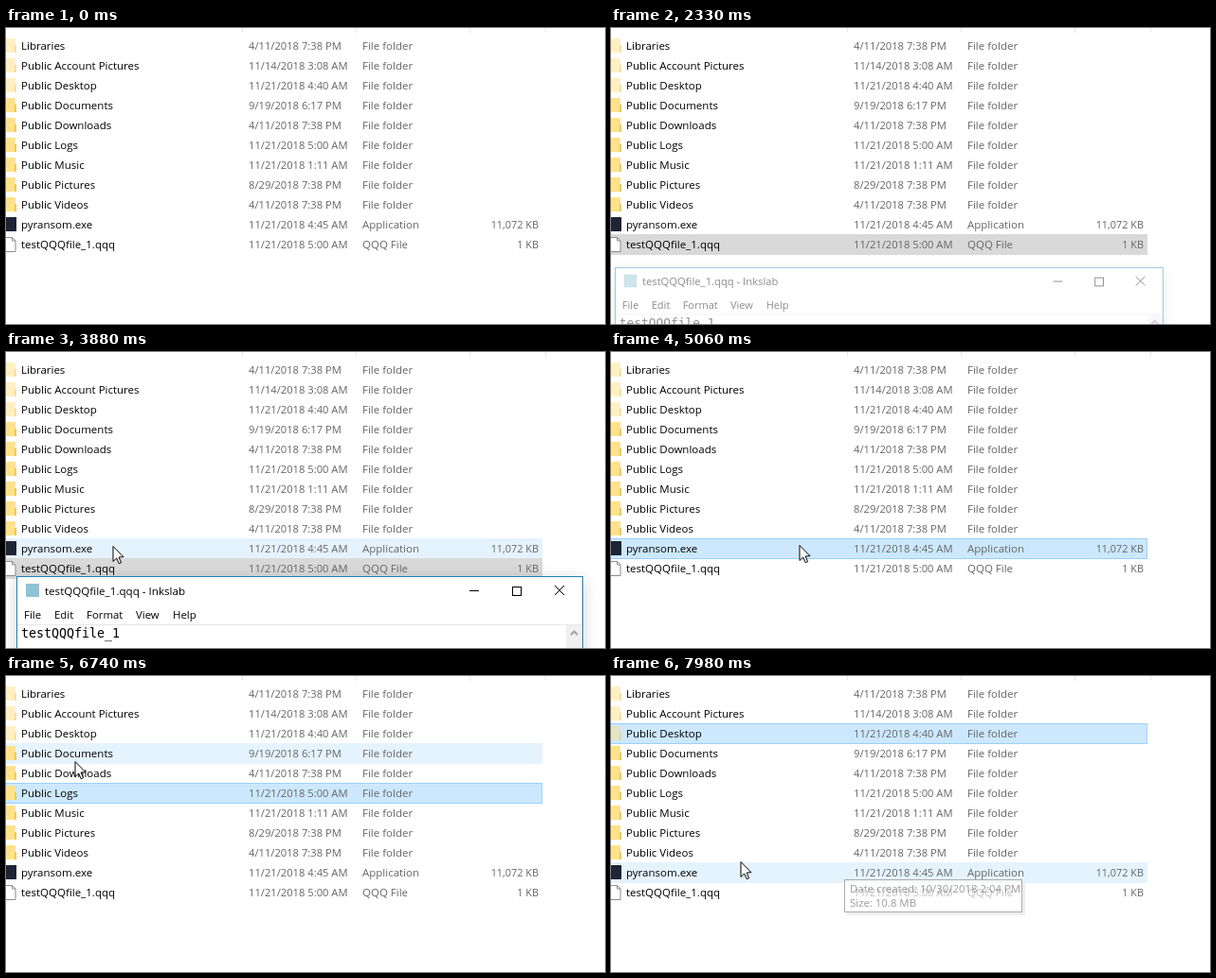
Write an HTML page with a canvas that moves like this. It is 632 by 313 pixels and loops after 8 s.

```html
<!DOCTYPE html>
<html lang="en">
<head>
<meta charset="utf-8">
<title>File list</title>
<style>
  html, body { margin: 0; width: 100%; height: 100%; overflow: hidden; background: #fff; }
  canvas { display: block; width: 632px; height: 313px; }
</style>
</head>
<body>
<canvas id="stage" width="632" height="313"></canvas>
<script>
const ctx = document.getElementById('stage').getContext('2d');
const LOOP = 8000, ROW = 21, TOP = 8, STEP = 60;
const UI = '"Open Sans", "Noto Sans", sans-serif';
const MONO = '"DejaVu Sans Mono", monospace';

const files = [
  ['Libraries', '4/11/2018 7:38 PM'],
  ['Public Account Pictures', '11/14/2018 3:08 AM'],
  ['Public Desktop', '11/21/2018 4:40 AM'],
  ['Public Documents', '9/19/2018 6:17 PM'],
  ['Public Downloads', '4/11/2018 7:38 PM'],
  ['Public Logs', '11/21/2018 5:00 AM'],
  ['Public Music', '11/21/2018 1:11 AM'],
  ['Public Pictures', '8/29/2018 7:38 PM'],
  ['Public Videos', '4/11/2018 7:38 PM'],
  ['pyransom.exe', '11/21/2018 4:45 AM', 'Application', '11,072 KB'],
  ['testQQQfile_1.qqq', '11/21/2018 5:00 AM', 'QQQ File', '1 KB']
];

// The pointer rests between stops; each stop is [arrival time, x, y].
const stops = [
  [0, 115, 340], [400, 104, 222], [900, 100, 219], [960, 100, 340],
  [2690, 228, 263], [3070, 247, 258], [3380, 249, 249], [3850, 113, 206],
  [4320, 203, 204], [4630, 199, 205], [5360, 165, 56], [5570, 141, 167],
  [5820, 120, 215], [6180, 76, 122], [6740, 73, 91], [7270, 74, 44],
  [7400, 76, 58], [7700, 128, 230], [7910, 138, 200], [7980, 137, 197]
];
const clicks = [740, 4060, 6490, 7400];
const blurs = [960, 5120];
const OPEN = 2330, OPENED = 2510, GRAB = 2690, DROP = 3400, CLOSED = clicks[1];

const lerp = (a, b, p) => a + (b - a) * p;
const last = (times, t) => times.filter(s => s <= t).pop() ?? -1;
const rowAt = y => Math.floor((y - TOP) / ROW);
const stepped = (t, from, span) => Math.min(1, Math.floor((t - from) / STEP) * STEP / span);

function pointerAt(t) {
  const i = stops.findIndex(s => s[0] > t);
  if (i < 0) return stops[stops.length - 1].slice(1);
  const [t0, x0, y0] = stops[i - 1], [t1, x1, y1] = stops[i];
  const span = Math.min(t1 - t0, 80 + 1.5 * Math.hypot(x1 - x0, y1 - y0));
  const p = Math.max(0, stepped(t, t1 - span, span));
  return [Math.round(lerp(x0, x1, p)), Math.round(lerp(y0, y1, p))];
}

// Left, top and opening progress; after GRAB the title bar follows the pointer.
function windowAt(t) {
  const p = stepped(t, OPEN, OPENED - OPEN);
  if (t < GRAB) return [lerp(4, -10, p), lerp(253, 251, p), p];
  const [x, y] = pointerAt(Math.min(t, DROP));
  return [x - 238, y - 12, 1];
}

function rect(x, y, w, h, color) {
  ctx.fillStyle = color;
  ctx.fillRect(x, y, w, h);
}

function frame(x, y, w, h, color) {
  ctx.strokeStyle = color;
  ctx.lineWidth = 1;
  ctx.strokeRect(x + .5, y + .5, w - 1, h - 1);
}

function text(str, x, y, size, color, align = 'left', family = UI) {
  ctx.font = `${size}px ${family}`;
  ctx.textAlign = align;
  ctx.fillStyle = color;
  ctx.fillText(str, x, y);
}

function line(color, width, ...points) {
  ctx.strokeStyle = color;
  ctx.lineWidth = width;
  ctx.beginPath();
  points.forEach(([x, y]) => ctx.lineTo(x, y));
  ctx.stroke();
}

function polygon(points, fill, stroke) {
  ctx.beginPath();
  points.forEach(([x, y]) => ctx.lineTo(x, y));
  ctx.closePath();
  ctx.fillStyle = fill;
  ctx.fill();
  ctx.strokeStyle = stroke;
  ctx.lineWidth = 1;
  ctx.stroke();
}

function drawFolder(mid, pale) {
  ctx.save();
  ctx.globalAlpha = pale ? .5 : 1;
  rect(-4, mid - 8, 14, 15, '#ffe28a');
  rect(9, mid - 1, 2, 8, '#f3c850');
  ctx.restore();
}

function drawPage(mid) {
  const l = -3.5, r = 10, t = mid - 7.5, b = mid + 7.5, fold = 3.5;
  polygon([[l, t], [r - fold, t], [r, t + fold], [r, b], [l, b]], '#fff', '#8c8c8c');
  line('#8c8c8c', 1, [r - fold, t], [r - fold, t + fold], [r, t + fold]);
}

function drawRow(i, selected, focused, hovered) {
  const [name, date, type = 'File folder', size] = files[i];
  const y = TOP + i * ROW, mid = y + 11, grey = '#666';
  if (selected) {
    rect(0, y, 566, 22, focused ? '#cce8ff' : '#d9d9d9');
    if (focused) frame(-1, y, 567, 22, '#99d1ff');
  } else if (hovered) {
    rect(0, y, 566, 22, '#e5f3ff');
  }
  if (i < 9) drawFolder(mid, i < 3);
  else if (i === 9) rect(-4, mid - 8, 15, 15, '#1d2433');
  else drawPage(mid);
  text(name, 16, mid + 4, 11.5, '#000');
  text(date, 256, mid + 4, 11.2, grey);
  text(type, 376, mid + 4, 11.5, grey);
  if (size) text(size, 562, mid + 4, 10.9, grey, 'right');
}

function drawShadow(w, h) {
  ctx.save();
  ctx.beginPath();
  ctx.rect(-40, -40, w + 80, h + 80);
  ctx.rect(0, 0, w, h);
  ctx.clip('evenodd');
  ctx.shadowColor = 'rgba(0,0,0,.18)';
  ctx.shadowBlur = 16;
  ctx.shadowOffsetY = 4;
  rect(0, 0, w, h, '#fff');
  ctx.restore();
}

function drawWindow(x, y, p) {
  const w = 598, h = 200, scale = lerp(.968, 1, p);
  ctx.save();
  ctx.translate(x, y);
  ctx.scale(scale, scale);
  ctx.globalAlpha = lerp(.45, 1, p);

  drawShadow(w, h);
  rect(0, 0, w, h, '#fff');
  frame(0, 0, w, h, '#1f80bd');

  rect(10, 8, 14, 14, '#8fc3d6');
  text('testQQQfile_1.qqq - Inkslab', 30, 20, 11.6, '#000');
  line('#000', 1, [478, 15.5], [488, 15.5]);
  frame(523, 11, 10, 10, '#000');
  line('#000', 1, [568, 10], [578, 20]);
  line('#000', 1, [578, 10], [568, 20]);

  [['File', 8], ['Edit', 40], ['Format', 74], ['View', 126], ['Help', 165]]
    .forEach(([label, left]) => text(label, left, 45, 11.4, '#000'));
  rect(1, 51, w - 2, 1, '#e8e8e8');
  rect(580, 52, 17, h - 53, '#f0f0f0');
  line('#a3a3a3', 2, [585, 62], [588.5, 58.5], [592, 62]);
  text('testQQQfile_1', 5, 65, 13.3, '#000', 'left', MONO);
  ctx.restore();
}

function drawTip() {
  ctx.save();
  ctx.globalAlpha = .6;
  rect(434, 218, 3, 35, '#e2e2e2');
  rect(249, 250, 185, 3, '#e2e2e2');
  rect(246, 215, 188, 35, '#fff');
  frame(246, 215, 188, 35, '#767676');
  text('Date created: 10/30/2018 2:04 PM', 252, 229, 11.4, '#575757');
  text('Size: 10.8 MB', 252, 244, 11.4, '#575757');
  ctx.restore();
}

function drawPointer(x, y) {
  ctx.save();
  ctx.translate(x, y - .5);
  polygon([[0, 0], [0, 16], [3.7, 12.5], [6.2, 18.2], [8.6, 17.2], [6.1, 11.5], [11, 11.2]],
    '#fff', '#000');
  ctx.restore();
}

function draw(t) {
  const [px, py] = pointerAt(t);
  const click = last(clicks, t);
  const selected = click < 0 ? -1 : rowAt(pointerAt(click)[1]);
  const focused = click > last(blurs, t);
  const pane = t >= OPEN && t < CLOSED ? windowAt(t) : null;
  const hovered = pane && py >= pane[1] ? -1 : rowAt(py);

  rect(0, 0, 632, 313, '#fff');
  [249, 369, 489, 569].forEach(x => rect(x, 0, 1, 5, '#e8e8e8'));
  files.forEach((_, i) => drawRow(i, i === selected, focused, i === hovered));
  if (pane) drawWindow(...pane);
  if (t >= 7980) drawTip();
  drawPointer(px, py);
}

const start = performance.now();
function tick() {
  draw((performance.now() - start) % LOOP);
  requestAnimationFrame(tick);
}
tick();
</script>
</body>
</html>
```
